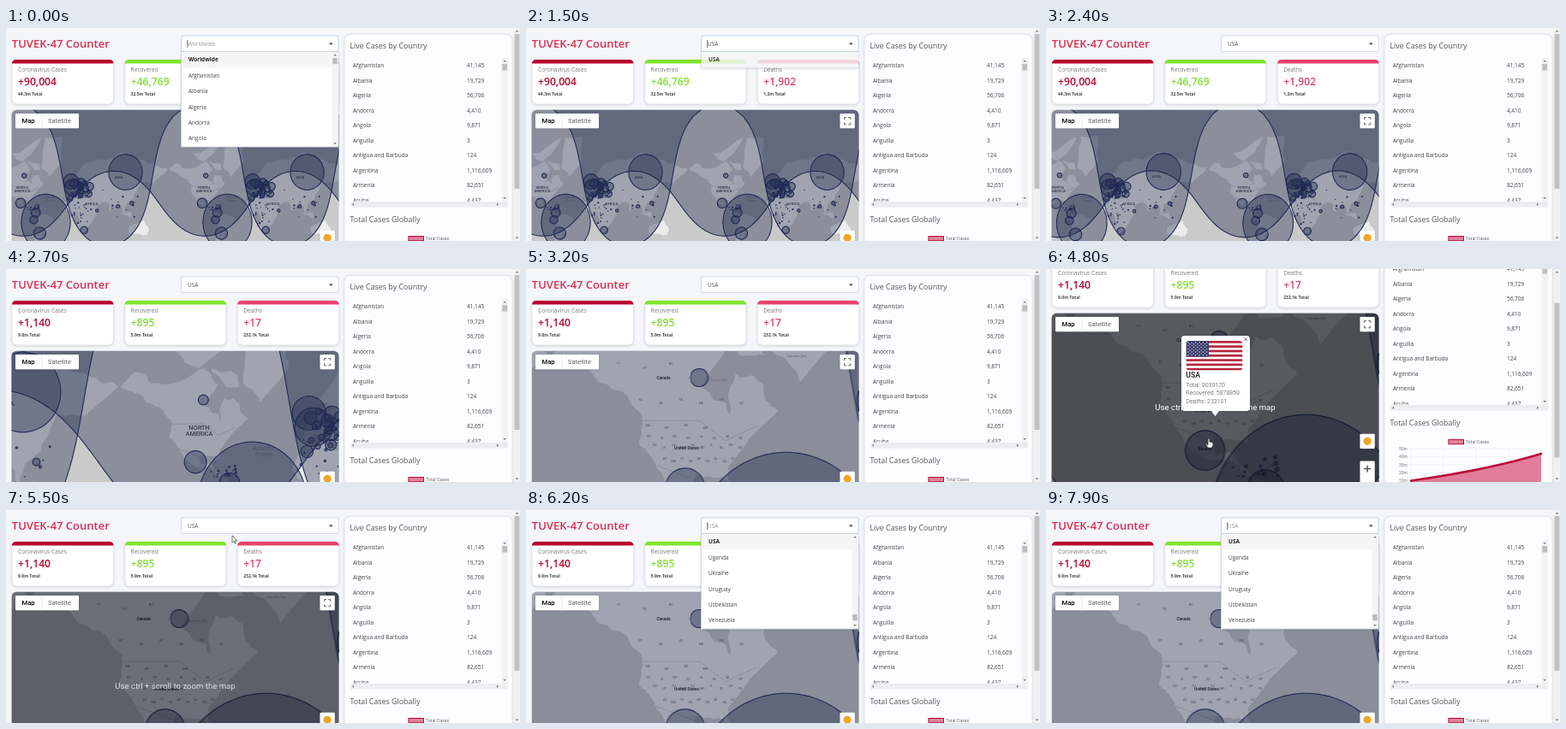
Recreate the animation shown at these times as an HTML page. Size 600 by 249 pixels, loop 8000 ms.

```html
<!DOCTYPE html>
<html lang="en">
<head>
<meta charset="utf-8">
<title>Case dashboard</title>
<style>
html, body { margin: 0; width: 100%; height: 100%; overflow: hidden; background: #f5f6fa; }
svg { display: block; width: 100vw; height: 100vh; }
text { font-family: "Open Sans", "Noto Sans", sans-serif; white-space: pre; }
.ui text, text.ui { font-family: Roboto, Arial, sans-serif; }
.zone { fill: #202a4a; fill-opacity: .37; stroke: #1f2b56; stroke-width: 1.1; vector-effect: non-scaling-stroke; }
</style>
</head>
<body>
<svg id="stage" viewBox="0 0 600 249" preserveAspectRatio="none"></svg>
<script>
const LOOP = 8000, WORLD = 848, RAD = Math.PI / 180;
const clamp = v => Math.max(0, Math.min(1, v));
const part = (t, a, b) => clamp((t - a) / (b - a));
const smooth = v => v * v * (3 - 2 * v);
const mix = (a, b, k) => a + (b - a) * k;
const fix = v => v.toFixed(2);
const $ = id => document.getElementById(id);
const range = (n, f) => Array.from({ length: n }, (_, i) => f(i));

let seed = 11;
const rnd = () => (seed = seed * 16807 % 2147483647) / 2147483647;
const bell = d => (rnd() + rnd() - 1) * d;

const rect = (x, y, w, h, fill, more = '') =>
  `<rect x="${x}" y="${y}" width="${w}" height="${h}" fill="${fill}" ${more}/>`;
const text = (x, y, size, fill, str, more = '') =>
  `<text x="${x}" y="${y}" font-size="${size}" fill="${fill}" ${more}>${str}</text>`;
const path = (d, fill, more = '') => `<path d="${d}" fill="${fill}" ${more}/>`;
const line = (d, ink, width, more = '') => path(d, 'none', `stroke="${ink}" stroke-width="${width}" ${more}`);

/* ---------- world map, origin at 38N 97W ---------- */
const merc = lat => Math.log(Math.tan(Math.PI / 4 + lat * RAD / 2));
const mapX = lon => (lon + 97) * WORLD / 360;
const mapY = lat => (merc(38) - merc(Math.min(lat, 89.95))) * WORLD / (2 * Math.PI);
const toPath = pts => 'M' + pts.map(p => fix(p[0]) + ' ' + fix(p[1])).join('L');

// A few key points (lon,lat) whose edges are broken up into a rough coast.
function coast(str) {
  let pts = str.split(' ').map(s => s.split(',').map(Number)).map(([lon, lat]) => [mapX(lon), mapY(lat)]);
  for (let pass = 0; pass < 3; pass++) pts = pts.flatMap((p, i) => {
    const q = pts[(i + 1) % pts.length], d = bell(Math.hypot(q[0] - p[0], q[1] - p[1]) * .22);
    return [p, [(p[0] + q[0]) / 2 + d, (p[1] + q[1]) / 2 - d]];
  });
  return toPath(pts) + 'Z';
}
const LAND = [
  '-168,66 -156,71 -115,68 -94,72 -82,67 -94,59 -80,51 -77,62 -64,60 -56,52 -70,43 -81,31 -80,25 -97,28 -97,20 -87,21 -78,9 -105,20 -117,33 -124,40 -123,48 -145,60',
  '-62,66 -75,66 -88,72 -70,71', '-120,76 -62,82 -80,76 -100,72', '-55,82 -20,82 -20,72 -45,60 -58,75',
  '-78,9 -50,0 -35,-7 -48,-27 -65,-45 -74,-50 -70,-18 -81,-6',
  '-9,37 -4,48 9,55 22,58 5,60 25,71 70,73 100,77 140,73 190,66 160,53 135,54 122,31 108,21 103,2 90,22 77,8 66,25 57,23 45,13 36,36 23,37 13,45 16,38 3,43',
  '-6,36 33,31 51,12 40,-15 20,-35 9,4 -17,15', '114,-22 142,-11 153,-27 148,-38 116,-35', '96,5 118,-8 117,6'
].map(coast).join('');
const BORDERS = `M${fix(mapX(-123))} ${fix(mapY(49))}H${fix(mapX(-95))}L${fix(mapX(-82))} ${fix(mapY(42))}L${fix(mapX(-67))} ${fix(mapY(47))}` +
  `M${fix(mapX(-117))} ${fix(mapY(32.5))}L${fix(mapX(-97))} ${fix(mapY(26))}`;

// Outline of a circle on the globe; one that holds the pole is open to the north.
function zone([lat, lon, cases]) {
  const r = cases * 8.65 * RAD, f = lat * RAD, pts = [];
  for (let b = 0; b < 360; b += cases > 2 ? 1.5 : 12) {
    const a = b * RAD;
    const sin = Math.sin(f) * Math.cos(r) + Math.cos(f) * Math.sin(r) * Math.cos(a);
    const d = Math.atan2(Math.sin(a) * Math.sin(r) * Math.cos(f), Math.cos(r) - Math.sin(f) * sin);
    pts.push([mapX(lon + d / RAD), mapY(Math.asin(sin) / RAD)]);
  }
  if (lat + r / RAD < 90) return { d: toPath(pts) + 'Z', open: false };
  pts.sort((p, q) => p[0] - q[0]);
  const row = range(6, k => pts.map(p => [p[0] + (k - 2) * WORLD, p[1]])).flat();
  row.push([4 * WORLD, -3000], [-3 * WORLD, -3000]);
  return { d: toPath(row) + 'Z', open: true };
}
const spread = (n, lat, dLat, lon, dLon, top) =>
  range(n, () => [lat + bell(dLat), lon + bell(dLon), .02 + top * rnd() ** 3]);

// lat, lon, millions of cases
const ZONES = [[38, -97, 8.9], [20, 70, 8.38], [-10, -52, 5.5], [60, 106, 1.85], [46, 2, 1.33], [54, -2, 1],
  [-34, -64, 1.15], [4, -72, 1.05], [22, -102, 1.05], [-10, -76, .9], [-29, 24, .72], [61, -95, .25],
  ...spread(52, 44, 16, 18, 26, .6), ...spread(26, 10, 34, 14, 36, .12),
  ...spread(16, 20, 28, 88, 46, .35), ...spread(16, 14.5, 7, -77, 15, .1)].map(zone);

const PLACES = [[64, -135, 13, 'YT NT NU'], [55, -124, 10, 'BC AB SK MB ON QC'], [47, -120.5, 9.5, 'WA MT ND MN'],
  [43.3, -120, 6.5, 'OR ID WY SD IA WI MI NY'], [40, -117, 4.7, 'NV UT CO NE KS MO IL IN OH PA'],
  [34.5, -112, 4.2, 'AZ NM TX OK AR TN AL GA SC']].flatMap(([lat, lon, step, names]) => names.split(' ').map((n, i) =>
  text(fix(mapX(lon + i * step)), fix(mapY(lat - i % 2 * .9)), 3.6, '#666', n)));
[[-37, -84, 'Canada'], [-10, -2, 'United States'], [-12, 43, 'Mexico']].forEach(([x, y, n]) =>
  PLACES.push(text(x, y, 4.8, '#333', n, 'font-weight="700"')));
[[27, -82, 'Hudson Bay'], [118, -110, 'Labrador Sea']].forEach(([x, y, n]) => PLACES.push(text(x, y, 4, '#888', n)));

const CONTINENTS = [[-4, -24, '#444', 'NORTH', 'AMERICA'], [320, 50, '#444', 'AFRICA'], [446, -74, '#444', 'ASIA'], [130, 18, '#999', 'Atlantic', 'Ocean']];
const copies = [-1, 0, 1, 2].map(k => k * WORLD);
const repeat = inner => copies.map(x => `<g transform="translate(${x} 0)">${inner}</g>`).join('');
const worldSvg =
  repeat(path(LAND, '#ececec') + line(BORDERS, '#a5a5a5', .5, 'vector-effect="non-scaling-stroke"')) +
  `<g id="places" text-anchor="middle" class="ui">${PLACES.join('')}</g>` +
  '<g id="continents" text-anchor="middle" font-weight="500" class="ui">' +
  repeat(CONTINENTS.map(([x, y, ink, ...words]) => `<text x="${x}" y="${y}" fill="${ink}">` +
    words.map((s, i) => `<tspan x="${x}" dy="${i}em">${s}</tspan>`).join('') + '</text>').join('')) + '</g>' +
  ZONES.map(z => z.open ? `<path class="zone" d="${z.d}"/>` : repeat(`<path class="zone" d="${z.d}"/>`)).join('');

/* ---------- page ---------- */
const CARDS = [
  ['#b8062f', '#b8062f', 'Coronavirus Cases', '+90,004', '44.3m', '+1,140', '9.0m'],
  ['#7fe52c', '#83dd35', 'Recovered', '+46,769', '32.5m', '+895', '5.9m'],
  ['#e8416b', '#e0446b', 'Deaths', '+1,902', '1.2m', '+17', '232.1k']];
const card = ([bar, ink, name], i) => `<g transform="translate(${7 + 131.6 * i} 0)">` +
  rect(0, 37.5, 118.5, 51.5, '#fff', 'rx="6" stroke="#dcdde3" stroke-width=".8" filter="url(#soft)"') +
  path('M0 41.5q0-4.5 5-4.5h108.5q5 0 5 4.5z', bar) +
  text(7, 51, 6.6, '#777', name) +
  text(7, 67.3, 12.2, ink, '', `id="num${i}" font-weight="600"`) +
  text(7, 79, 5, '#444', '', `id="sum${i}" font-weight="700"`) + '</g>';

const ROWS = [['Afghanistan', '41,145'], ['Albania', '19,729'], ['Algeria', '56,706'], ['Andorra', '4,410'], ['Angola', '9,871'],
  ['Anguilla', '3'], ['Antigua and Barbuda', '124'], ['Argentina', '1,116,609'], ['Armenia', '82,651'], ['Aruba', '4,437']];
const table = ROWS.map(([n, v], i) => text(405, 46 + 17.5 * i, 6.5, '#444', n) + text(538, 46 + 17.5 * i, 6.5, '#444', v)).join('');
const tri = (x, y, dir) => path(`M${x - 1.8} ${y + dir}h3.6l-1.8 ${-2 * dir}z`, '#777');

const CURVE = 'M426 291.5Q515 279 578 260';
const chart = range(5, i =>
  line(`M423 ${254.5 + 9.25 * i}H578M${426 + 38 * i} 254.5V300`, '#e6e6e6', .5) +
  text(422, 256.2 + 9.25 * i, 5, '#777', `${50 - 10 * i}m`, 'text-anchor="end" class="ui"')).join('') +
  path(CURVE + 'V310H426z', '#e07e99') + line(CURVE, '#bd0b38', 2.6, 'stroke-linecap="round"');

const panel =
  rect(395, 7.5, 196, 320, '#fdfcff', 'rx="7" stroke="#dedfe5" stroke-width=".8" filter="url(#soft)"') +
  text(401.5, 24, 8.9, '#555', 'Live Cases by Country') +
  `<g clip-path="url(#tableClip)">${table}</g>` +
  rect(578.5, 35, 7.5, 168, '#f2f2f2') + rect(579.3, 42, 5.9, 7.5, '#bfbfbf') + tri(582.2, 38.5, 1) + tri(582.2, 199, -1) +
  rect(402, 203, 184, 6.5, '#ededef') +
  path('M406 204.5v3.6l-2-1.8zM573 204.5v3.6l2-1.8z', '#777') +
  text(401.5, 227, 8.9, '#555', 'Total Cases Globally') +
  rect(470, 243.5, 17.5, 5.2, '#e0819a', 'stroke="#bd0b38" stroke-width="1"') +
  text(490, 248, 5.2, '#666', 'Total Cases', 'class="ui"') + chart;

const button = (x, y, w, h) => rect(x, y, w, h, '#fff', 'rx="1" filter="url(#soft)"');
const controls = '<g class="ui">' + button(11, 100, 74, 17.3) + line('M41.5 100v17.3', '#e4e4e4', .7) +
  text(18.5, 111.4, 7.6, '#000', 'Map', 'font-weight="500"') + text(49, 111.4, 7.5, '#5f5f5f', 'Satellite') +
  button(366.5, 100, 17.3, 17.3) +
  line('M371.5 107v-2.5h2.5M376.3 104.5h2.5v2.5M378.8 110.3v2.5h-2.5M374 112.8h-2.5v-2.5', '#666', 1) +
  button(366.5, 236.7, 17.3, 17.3) + '<circle cx="375.1" cy="245.3" r="4.6" fill="#f0a526"/>' +
  button(366.5, 268.5, 17.3, 35) + line('M371 277.5h8.2M375.1 273.4v8.2', '#555', 1.5) + '</g>';

const flag = rect(163.5, 128, 66, 34.5, '#fff') +
  range(7, i => rect(163.5, fix(128 + i * 5.31), 66, 2.66, '#b4253f')).join('') + rect(163.5, 128, 26.5, 18.6, '#383b69') +
  range(9, r => range(6 - r % 2, c =>
    `<circle cx="${fix(165.8 + c * 4.4 + r % 2 * 2.2)}" cy="${fix(129.9 + r * 1.85)}" r=".65" fill="#fff"/>`).join('')).join('');
const popup = '<g id="popup" class="ui">' +
  path('M162 122h72q4 0 4 4v80q0 4-4 4h-32l-4.5 6-4.5-6h-31q-4 0-4-4v-80q0-4 4-4z', '#fff', 'filter="url(#soft)"') +
  `<g clip-path="url(#flagClip)">${flag}</g>` + line('M231.5 124.5l3.4 3.4m0-3.4l-3.4 3.4', '#555', .9) +
  text(163.3, 170.5, 8.6, '#333', 'USA', 'font-weight="700"') +
  ['Total: 9039170', 'Recovered: 5878859', 'Deaths: 232101'].map((s, i) =>
    text(163.3, 181.5 + 9.9 * i, 7, '#444', s, 'font-weight="300"')).join('') + '</g>';

const picker = rect(204.5, 9, 183.5, 18.5, '#fff', 'id="field" rx="1.8" stroke-width=".8"') +
  text(212, 20.8, 6.5, '#444', '', 'id="value"') + rect(211.5, 14, .7, 9, '#333', 'id="caret"') +
  path('M376.8 17.4h5l-2.5 2.7z', '#444') +
  '<g id="menu">' + rect(204.5, 27.5, 183.5, 111.5, '#fff', 'id="sheet" stroke="#c9d4dc" stroke-width=".8" filter="url(#soft)"') +
  rect(205, 28, 182.5, 18.3, '#f5f5f5') + '<g id="items"></g><g id="bar">' +
  rect(380.5, 28, 7, 110.5, '#f4f4f4') + tri(384, 31.5, 1) + tri(384, 135, -1) +
  rect(381.2, 35, 5.6, 7.2, '#bdbdbd', 'id="thumb"') + '</g></g>';

$('stage').innerHTML = `<defs>
  <filter id="soft" x="-10%" y="-10%" width="120%" height="130%"><feDropShadow dx="0" dy=".8" stdDeviation="1.2" flood-color="#334" flood-opacity=".2"/></filter>
  <clipPath id="mapClip"><rect x="6.5" y="95.7" width="382" height="230" rx="6"/></clipPath>
  <clipPath id="tableClip"><rect x="400" y="34" width="178" height="168.5"/></clipPath>
  <clipPath id="flagClip"><rect x="163.5" y="128" width="66" height="34.5" rx="4"/></clipPath></defs>` +
  rect(0, 0, 600, 249, '#f5f6fa') + '<g id="page">' +
  text(6.8, 23, 13, '#dc2f52', 'TUVEK-47 Counter', 'font-weight="600"') + CARDS.map(card).join('') +
  `<g clip-path="url(#mapClip)">${rect(6, 95, 383, 232, '#cacaca')}<g id="world">${worldSvg}</g>
   <g id="hint">${rect(6, 95, 383, 232, '#000', 'fill-opacity=".45"')}
   ${text(197.5, 208.6, 9.6, '#fff', 'Use ctrl + scroll to zoom the map', 'class="ui" text-anchor="middle"')}</g>
   ${controls}${popup}</g>` + panel + picker + '</g>' +
  rect(593, 0, 7, 249, '#f1f1f1') + tri(596.5, 3.5, 1) + tri(596.5, 245.5, -1) + rect(593.6, 7, 5.8, 181, '#c1c1c1', 'id="pageThumb"') +
  '<g id="pointer">' +
  path('M0 0v8l2-1.7 1.3 2.9 1.2-.6-1.3-2.7h2.6z', '#fff', 'id="arrow" stroke="#222" stroke-width=".6"') +
  path('M-.9 4V-3.2q.9-1.4 1.8 0V.2q2.8-.3 4 1.3v2.8L3.4 7H-.8L-3.4 3.2q.3-1.5 2.5.8z', '#fff', 'id="hand" stroke="#222" stroke-width=".6"') + '</g>';

/* ---------- motion ---------- */
const LISTS = {
  all: ['Worldwide', 'Afghanistan', 'Albania', 'Algeria', 'Andorra', 'Angola'],
  u: ['Anguilla', 'Antigua and Barbuda', 'Aruba', 'Australia', 'Austria', 'Belarus'],
  us: ['Australia', 'Austria', 'Belarus', 'Cyprus', 'Mauritius', 'Russia'],
  usa: ['USA'],
  end: ['USA', 'Uganda', 'Ukraine', 'Uruguay', 'Uzbekistan', 'Venezuela']
};
// Screen place of the map origin at three zoom levels.
const VIEWS = [[232, 194], [234, 199], [197.5, 213]];
// time, x, y; the pointer rests on each stop for a moment
const STOPS = [[3250, 205, 215], [3500, 258, 162], [4450, 190, 202], [5250, 233, 126], [5480, 264, 30], [5850, 300, 18]];
const show = (id, on) => $(id).setAttribute('opacity', Number(on));
const set = (id, key, v) => $(id).setAttribute(key, v);
const put = (id, s) => { if ($(id).textContent !== s) $(id).textContent = s; };

function drawMap(t) {
  const z = smooth(part(t, 2350, 2980)) * 2, i = z < 1 ? 0 : 1, s = 2 ** (z - 2);
  const [x, y] = [0, 1].map(a => mix(VIEWS[i][a], VIEWS[i + 1][a], z - i));
  set('world', 'transform', `translate(${fix(x)} ${fix(y)}) scale(${s.toFixed(4)})`);
  set('continents', 'font-size', fix((4.3 + 2.6 * z) / s));
  show('continents', 1 - part(z, 1.3, 1.8));
  show('places', part(z, 1.5, 2));
}

function drawPicker(t) {
  const late = t >= 5850, typed = t < 300 || t >= 1500 ? '' : t < 600 ? 'u' : t < 700 ? 'us' : 'usa';
  const key = late ? 'end' : t < 300 ? 'all' : typed || 'usa', list = LISTS[key];
  const open = late ? part(t, 5850, 6000) : 1 - part(t, 1450, 1750);
  show('menu', open);
  set('field', 'stroke', open ? '#b4cfdc' : '#cfd2d8');
  put('value', typed || (t < 300 ? 'Worldwide' : 'USA'));
  set('value', 'fill', open === 1 && !typed ? '#999' : '#555');
  const blink = late ? (t - 5800) % 1000 < 500 || t >= 7900 : t < 100 || t >= 300 && t < 1200 || t >= 1500 && t < 1800;
  show('caret', blink);
  set('caret', 'x', typed ? fix(212.4 + $('value').getComputedTextLength()) : 211.5);
  if ($('items').dataset.key === key) return;
  $('items').dataset.key = key;
  $('items').innerHTML = list.map((s, i) =>
    text(213, fix(39.3 + 18.4 * i), 6.5, i ? '#444' : '#222', s, i ? '' : 'font-weight="700"')).join('');
  set('sheet', 'height', list.length > 1 ? 111.5 : 18.8);
  show('bar', key !== 'usa' && key !== 'us');
  set('thumb', 'y', late ? 122 : 35);
  set('thumb', 'height', key === 'u' ? 22 : 7.2);
}

function drawPointer(t) {
  const n = STOPS.findIndex(p => p[0] > t);
  show('pointer', n > 0);
  if (n < 1) return;
  const [a, b] = [STOPS[n - 1], STOPS[n]], k = smooth(part(t, Math.max(a[0] + 70, b[0] - 320), b[0]));
  set('pointer', 'transform', `translate(${fix(mix(a[1], b[1], k))} ${fix(mix(a[2], b[2], k))})`);
  show('hand', t < 5330);
  show('arrow', t >= 5330);
}

function draw(t) {
  const scroll = 44 * (smooth(part(t, 3530, 3790)) - smooth(part(t, 4850, 5150)));
  set('page', 'transform', `translate(0 ${fix(-scroll)})`);
  set('pageThumb', 'y', fix(7 + scroll * .74));
  const k = t < 2450 ? 3 : 5;
  CARDS.forEach((c, i) => { put('num' + i, c[k]); put('sum' + i, c[k + 1] + ' Total'); });
  show('hint', part(t, 3600, 3890) * (1 - part(t, 5400, 5760)));
  show('popup', t >= 3300 && t < 5300);
  drawMap(t);
  drawPicker(t);
  drawPointer(t);
}

const start = performance.now();
function tick() {
  draw((performance.now() - start) % LOOP);
  requestAnimationFrame(tick);
}
tick();
</script>
</body>
</html>
```
